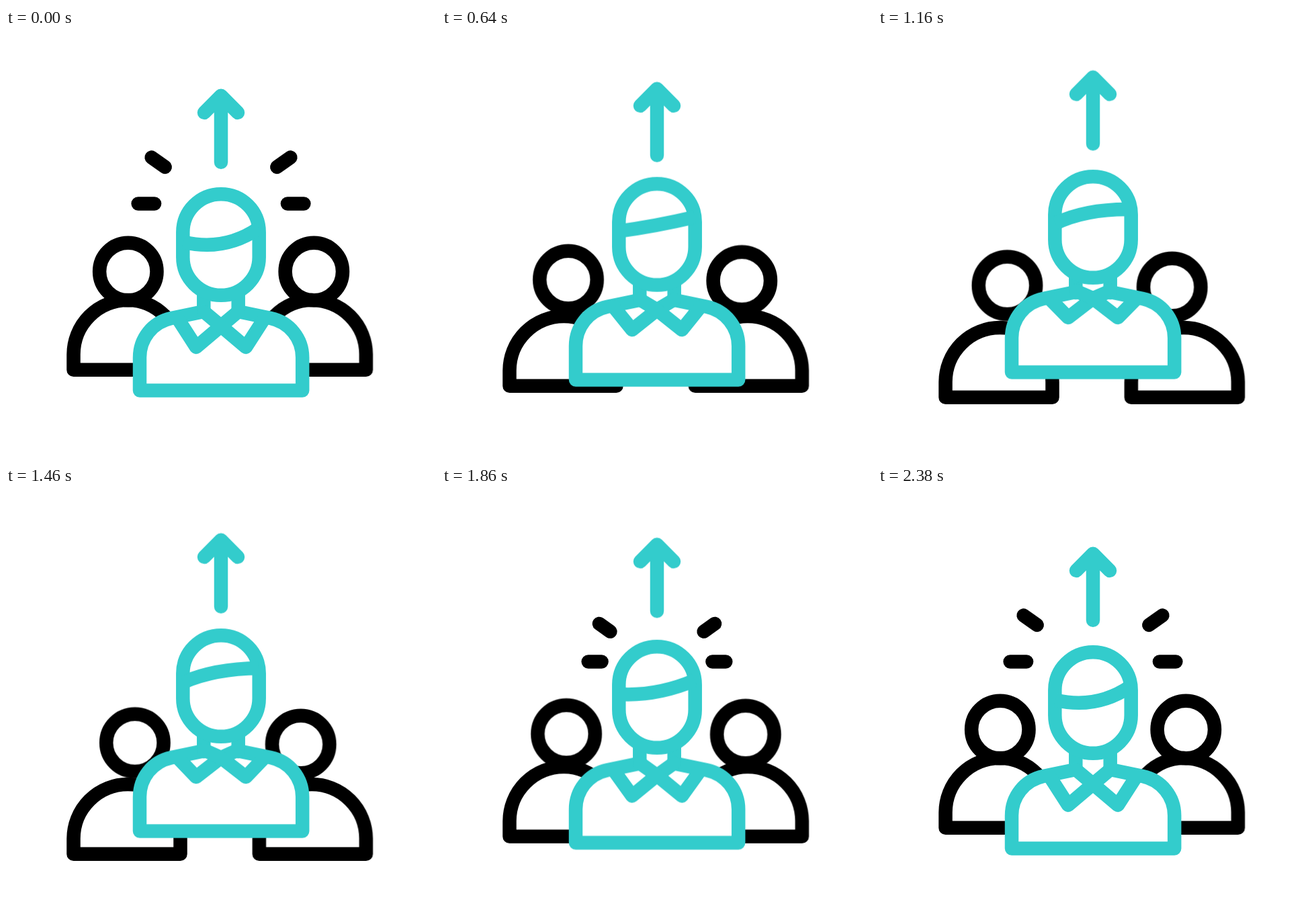
Write an HTML page without scripts that moves like this. It is 640 px wide and 640 px high and loops after 2.4 s.

```html
<!DOCTYPE html>
<html lang="en">
<head>
<meta charset="utf-8">
<title>Team leader</title>
<style>
  html, body { margin: 0; width: 100%; height: 100%; overflow: hidden; background: #fff; }
  svg { display: block; width: 100%; height: 100%; }

  .ink { fill: none; stroke: #000; stroke-width: 20.5; stroke-linecap: round; stroke-linejoin: round; }
  .teal { stroke: #3cc; }
  .solid { fill: #fff; }

  .sway, .fringe, .shirt, .lapel { animation: sway 2.4s cubic-bezier(.69, 0, .31, 1) infinite; }
  @keyframes sway {
    0%, 1%, 99%, 100% { transform: translate(0, 0); }
    49.8% { transform: translate(var(--dx, 0px), var(--dy)); }
  }

  .fringe { stroke-linecap: butt; animation-name: fringe; }
  @keyframes fringe {
    0%, 1%, 99%, 100% { d: path("M264 318.5 Q325 333 376 298"); }
    49.8% { d: path("M264 317 Q310 295 376 296"); }
  }

  .shirt { animation-name: shirt; }
  @keyframes shirt {
    0%, 1%, 99%, 100% { d: path("M294.3 422 L246 432 C218 438 199 462 199 490.5 V539.5 H441.2 V490.5 C441.2 462 422 438 394 432 L345.7 422"); }
    49.8% { d: path("M294.3 420 L246 430 C218 436 199 460 199 488.5 V539.5 H441.2 V488.5 C441.2 460 422 436 394 430 L345.7 420"); }
  }

  .lapel { animation-name: lapel; }
  @keyframes lapel {
    0%, 1%, 99%, 100% { d: path("M345.7 422 L320 443.7 L283 475 L255 431.5"); }
    49.8% { d: path("M345.7 418.5 L320 429.5 L283 458 L255 429.5"); }
  }

  .arrow { animation: hop 2.4s cubic-bezier(.33, 0, .67, 1) infinite; }
  @keyframes hop {
    0%, 84.6%, 100% { transform: translateY(0); }
    17.9% { transform: translateY(11px); }
    39.6% { transform: translateY(-48px); }
    55% { transform: translateY(-14px); }
    69.2% { transform: translateY(-31px); }
  }

  /* Each ray is one dash travelling outwards along a path of length 100. */
  .rays {
    animation: stretch 2.4s cubic-bezier(.33, 0, .67, 1) infinite,
               travel 2.4s cubic-bezier(.33, 0, .67, 1) infinite,
               blink 2.4s step-end infinite;
  }
  @keyframes stretch {
    0%, 91.2%, 100% { stroke-dasharray: 22.7 300; }
    17.9%, 62% { stroke-dasharray: .2 300; }
    85.4% { stroke-dasharray: 25 300; }
  }
  @keyframes travel {
    0%, 91.2%, 100% { stroke-dashoffset: -38.1; }
    17.9%, 40% { stroke-dashoffset: -99.8; }
    40.01%, 59.8% { stroke-dashoffset: 0; }
  }
  @keyframes blink {
    0%, 61.5% { visibility: visible; }
    20% { visibility: hidden; }
  }
</style>
</head>
<body>
<svg viewBox="0 0 640 640">
  <g class="ink rays">
    <path pathLength="100" d="M262 261.5 H154.5"/>
    <path pathLength="100" d="M270.6 230.8 L181.7 168"/>
    <path pathLength="100" d="M378 261.5 H485.5"/>
    <path pathLength="100" d="M369.4 230.8 L458.3 168"/>
  </g>

  <g class="ink">
    <g class="sway" style="--dy: 41px">
      <path id="torso" d="M100.5 508.7 V486 A81 81 0 0 1 181.5 405 A78 81 0 0 1 259.5 486 V508.7 Z"/>
      <use href="#torso" transform="matrix(-1 0 0 1 636.4 0)"/>
    </g>
    <circle cx="181.8" cy="362.5" r="42.7" class="sway" style="--dx: 10.6px; --dy: 20.7px"/>
    <circle cx="458.3" cy="362.5" r="42.7" class="sway" style="--dx: -20.6px; --dy: 23.2px"/>
  </g>

  <g class="ink teal">
    <g class="sway" style="--dy: -27.2px">
      <path class="solid shirt" d="M294.3 422 L246 432 C218 438 199 462 199 490.5 V539.5 H441.2 V490.5 C441.2 462 422 438 394 432 L345.7 422"/>
      <path d="M294.3 390 V421 M345.7 390 V421"/>
      <path class="lapel" d="M345.7 422 L320 443.7 L283 475 L255 431.5"/>
      <g transform="matrix(-1 0 0 1 640 0)">
        <path class="lapel" d="M345.7 422 L320 443.7 L283 475 L255 431.5"/>
      </g>
    </g>
    <g class="sway" style="--dy: -26.2px">
      <rect class="solid" x="263.3" y="247.2" width="113.4" height="150.6" rx="56.7"/>
      <path class="fringe" d="M264 318.5 Q325 333 376 298"/>
    </g>
    <path class="arrow" d="M320 199.7 V100.7 M295 126 L320 100.7 L345 126"/>
  </g>
</svg>
</body>
</html>
```
